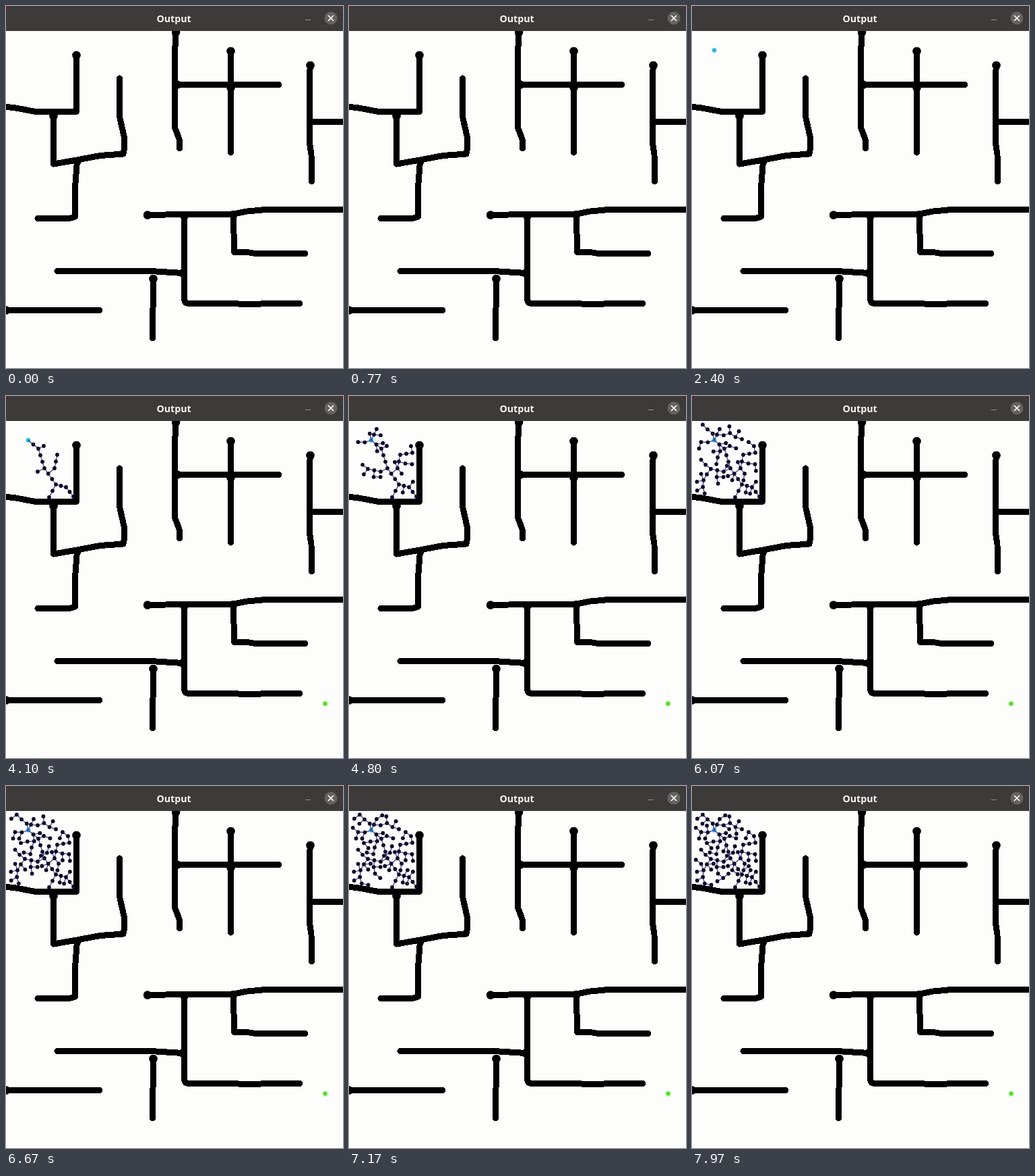
These frames come from a looping animation (500x536 px, 8000 ms). An HTML page:

```html
<!DOCTYPE html>
<html lang="en">
<head>
<meta charset="utf-8">
<title>Output</title>
<style>
  html, body { margin: 0; width: 100%; height: 100%; overflow: hidden; background: #fdfdfb; }
  svg { display: block; width: 500px; height: 536px; }
  text { font: bold 14.2px "Open Sans", "Noto Sans", sans-serif; fill: #f6f6f2; }
  #walls { fill: none; stroke: #000; stroke-width: 9; stroke-linecap: round; stroke-linejoin: round;
    shape-rendering: crispEdges; }
  #walls path { marker-start: url(#joint); }
  #edges { stroke: #34309a; stroke-width: 1.2; }
  #nodes { fill: #0c0a2c; }
</style>
</head>
<body>
<svg viewBox="0 0 500 536">
  <marker id="joint" markerUnits="userSpaceOnUse" markerWidth="13" markerHeight="13" refX="6.500" refY="6.500">
    <circle cx="6.500" cy="6.500" r="6.300"/>
  </marker>
  <rect width="500" height="536" fill="#fdfdfb"/>
  <g id="walls">
    <path d="M104.500 73V156.500H44L12 150.500L0 149.500"/>
    <path d="M70.500 163V234L105 228L140 221.500L174 219L176 208L175.500 195L169 166L168.500 107"/>
    <path d="M105.500 230L103 262L102.500 312L94 314.500H47"/>
    <path d="M252 39L250.500 70V180L257 197L257.500 211"/>
    <path d="M254 116.500H405"/>
    <path d="M333.500 67V217"/>
    <path d="M333.500 121V122"/>
    <path d="M451.500 88L450.500 100V203L453 220L453.500 260"/>
    <path d="M510 171.500H455"/>
    <path d="M210 309.500L264 308.500H335L358 304L385 301.500H505"/>
    <path d="M264.500 311V434Q265 440.500 271 440.500H340L355 442L390 440.500H436"/>
    <path d="M337.500 309L338.500 364.500H358L370 366.500H444"/>
    <path d="M262 395.500L215 392.500H76"/>
    <path d="M218.500 404L217.500 492"/>
    <path d="M0 450.500H139"/>
  </g>
  <circle id="start" cx="33" cy="65.500" r="3.200" fill="#12bdf0"/>
  <circle id="goal" cx="473.500" cy="455.500" r="3.200" fill="#3cf000"/>
  <g id="edges"></g>
  <g id="nodes"></g>
  <rect width="500" height="37" fill="#3d3a3a"/>
  <path d="M0 0H4Q1 1 0 4ZM500 0H496Q499 1 500 4Z" fill="#8a1410"/>
  <text x="249" y="24" text-anchor="middle">Output</text>
  <path d="M444 20.500H452" stroke="#94928e"/>
  <circle cx="482" cy="18" r="9.500" fill="#656361"/>
  <path d="M478 14L486 22M486 14L478 22" stroke="#fff" stroke-width="1.700"/>
</svg>
<script>
const LOOP = 8000, START = 2400, GROW = 3900, GROW_TIME = 4060;
const STEP = 10, GAP = 6, SIZE = 96;

const byId = id => document.getElementById(id);
const make = (parent, tag, attrs) => {
  const el = document.createElementNS("http://www.w3.org/2000/svg", tag);
  for (const k in attrs) el.setAttribute(k, attrs[k]);
  return byId(parent).appendChild(el);
};

let seed = 7;
const random = () => (seed = seed * 16807 % 2147483647) / 2147483647;

const tree = [{ x: 33, y: 65.5 }];
const dist = (a, b) => Math.hypot(a.x - b.x, a.y - b.y);
const nearest = p => tree.reduce((a, b) => dist(b, p) < dist(a, p) ? b : a);
const between = (a, b, f) => ({ x: a.x + (b.x - a.x) * f, y: a.y + (b.y - a.y) * f });

// Walk from the nearest node all the way to a target.
function reach(x, y) {
  const to = { x, y }, from = nearest(to);
  const count = Math.max(1, Math.round(dist(from, to) / STEP));
  let prev = from;
  for (let i = 1; i <= count; i++) {
    prev = { ...between(from, to, i / count), from: prev };
    tree.push(prev);
  }
}

// The explored room: walls on three sides, and a corner not yet reached.
const inRoom = ({ x, y }) => x > 5 && x < 99 && y > 40 && y < 148 && x - y < 18;

// Take one step from the nearest node towards a random sample.
function explore() {
  const sample = { x: random() * 110, y: 35 + random() * 120 };
  const from = nearest(sample);
  const p = between(from, sample, STEP / dist(from, sample));
  if (inRoom(p) && dist(nearest(p), p) > GAP) tree.push({ ...p, from });
}

const branches = [
  [48, 78], [57, 107], [74, 131], [89, 135], [100, 149], [56, 74], [72, 107],
  [47, 112], [64, 150], [76, 87], [41, 49], [94, 84], [28, 108]
];
for (const [x, y] of branches) reach(x, y);
for (let i = 0; i < 5000 && tree.length < SIZE; i++) explore();

const timed = [
  { at: START, els: [byId("start")] },
  { at: GROW, els: [byId("goal")] }
];
// Growth slows down as free space runs out.
tree.slice(1).forEach((n, i) => timed.push({
  at: GROW + GROW_TIME * (i / tree.length) ** 1.82,
  els: [
    make("edges", "line", { x1: n.from.x, y1: n.from.y, x2: n.x, y2: n.y }),
    make("nodes", "circle", { cx: n.x, cy: n.y, r: 2.9 })
  ]
}));

const origin = performance.now();
function draw() {
  const t = (performance.now() - origin) % LOOP;
  for (const { at, els } of timed)
    for (const el of els) el.style.visibility = t >= at ? "visible" : "hidden";
  requestAnimationFrame(draw);
}
draw();
</script>
</body>
</html>
```
